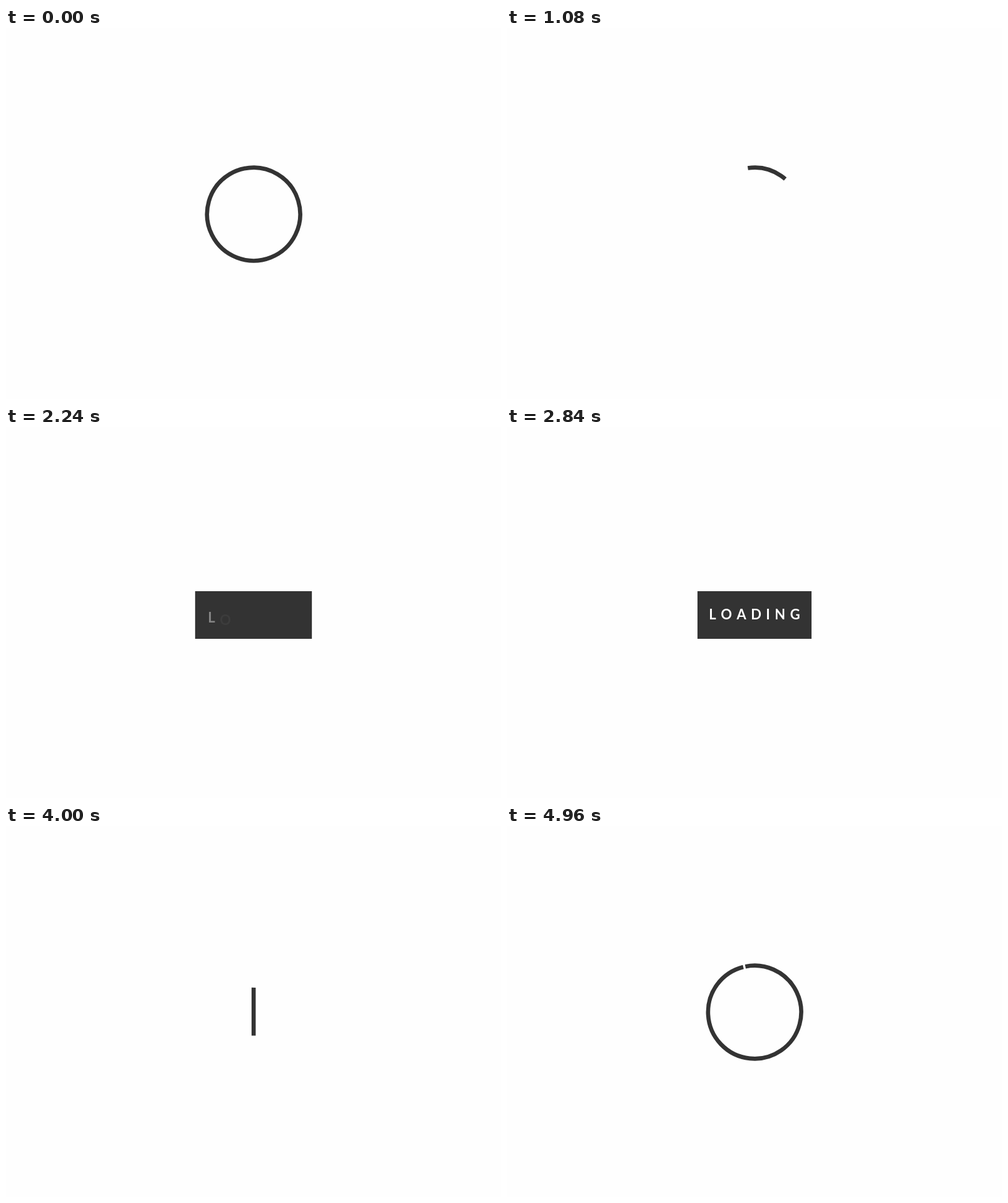
An HTML page that plays this animation: 790x592 px, repeating every 5 s.

```html
<!DOCTYPE html>
<html lang="en">
<head>
<meta charset="utf-8">
<title>Loading</title>
<style>
  html, body { margin: 0; width: 100%; height: 100%; overflow: hidden; background: #fefefe; }
  svg { display: block; }
  path { fill: none; stroke: #333; stroke-width: 6.6; }
  rect { fill: #333; }
  text { fill: #fff; font: bold 22px Lato, sans-serif; letter-spacing: 7.45px; font-kerning: none; }
</style>
</head>
<body>
<svg width="790" height="592" viewBox="0 0 790 592">
  <path id="stroke"/>
  <rect id="box" y="262" height="76"/>
  <text id="label" x="322.3" y="307"></text>
</svg>
<script>
const LOOP = 5000, STEP = 40;
const CX = 395.2, CY = 297, R = 74.3;
const TOP = 262, BOTTOM = 338, LINE = BOTTOM - TOP;
const SEAM = -102, JOIN = 30, BEND = 37, PULL = 44;
const LAP = 2 * Math.PI * R;
const [stroke, box, label] = ['stroke', 'box', 'label'].map(id => document.getElementById(id));

const rad = deg => deg * Math.PI / 180;
const onRing = deg => [CX + R * Math.cos(rad(deg)), CY + R * Math.sin(rad(deg))];
const progress = (t, from, to) => Math.min(1, Math.max(0, (t - from) / (to - from)));
const smooth = p => p * p * (3 - 2 * p);
const mix = (a, b, p) => a + (b - a) * p;

// Clockwise arc commands between two angles, split into short pieces.
function arc(from, to) {
  const n = Math.ceil((to - from) / 90);
  let d = '';
  for (let i = 1; i <= n; i++) d += `A${R} ${R} 0 0 1 ${onRing(mix(from, to, i / n))}`;
  return d;
}

// Control point on the ring's tangent, before (-1) or after (1) the given angle.
function tangent(deg, side) {
  const [x, y] = onRing(deg);
  return [x - side * PULL * Math.sin(rad(deg)), y + side * PULL * Math.cos(rad(deg))];
}

const low = CY + BEND, high = CY - BEND;
const inward = `M${onRing(SEAM)}${arc(SEAM, JOIN + 720)}`
  + `C${tangent(JOIN, 1)} ${CX},${low + PULL} ${CX},${low}L${CX},${TOP}`;
const outward = `M${CX},${BOTTOM}L${CX},${high}`
  + `C${CX},${high - PULL} ${tangent(-JOIN, -1)} ${onRing(-JOIN)}${arc(-JOIN, SEAM + 720)}`;

function lengthOf(d) {
  stroke.setAttribute('d', d);
  return stroke.getTotalLength();
}
const inLength = lengthOf(inward), outLength = lengthOf(outward);

const letters = [...'LOADING'].map(char => {
  const span = document.createElementNS('http://www.w3.org/2000/svg', 'tspan');
  span.textContent = char;
  label.append(span);
  return span;
});

function drawStroke(d, tail, head) {
  stroke.setAttribute('d', d);
  stroke.setAttribute('stroke-dasharray', `0 ${tail} ${head - tail} 9999`);
}

function boxWidth(t) {
  if (t < 2160) return mix(6.5, 190, smooth(progress(t, 1770, 2160)));
  if (t < 3700) return mix(190, 182, smooth(progress(t, 2160, 2330)));
  return mix(182, 6.5, smooth(progress(t, 3700, 3960)));
}

function draw(t) {
  const boxed = t >= 1770 && t < 3960;
  box.style.display = label.style.display = boxed ? '' : 'none';
  stroke.style.display = boxed ? 'none' : '';

  if (boxed) {
    const width = boxWidth(t);
    box.setAttribute('x', 395 - width / 2);
    box.setAttribute('width', width);
    label.setAttribute('opacity', 1 - progress(t, 3700, 3860));
    letters.forEach((span, i) => {
      const shown = smooth(progress(t, 2132 + i * 75, 2382 + i * 75));
      span.setAttribute('y', 307 + 9 * (1 - shown));
      span.setAttribute('fill-opacity', shown);
    });
  } else if (t < 1770) {
    const p = progress(t, 112, 1700);
    drawStroke(inward,
      mix(0, inLength - LINE, smooth(p ** 0.725)),
      mix(LAP + 0.5, inLength, smooth(p)));
  } else {
    drawStroke(outward,
      mix(0, outLength - LAP, smooth(progress(t, 3960, 4800))),
      mix(LINE, outLength, smooth(progress(t, 3960, LOOP))));
  }
}

const start = performance.now();
function tick() {
  const t = (performance.now() - start) % LOOP;
  draw(Math.floor(t / STEP) * STEP);
  requestAnimationFrame(tick);
}
tick();
</script>
</body>
</html>
```
